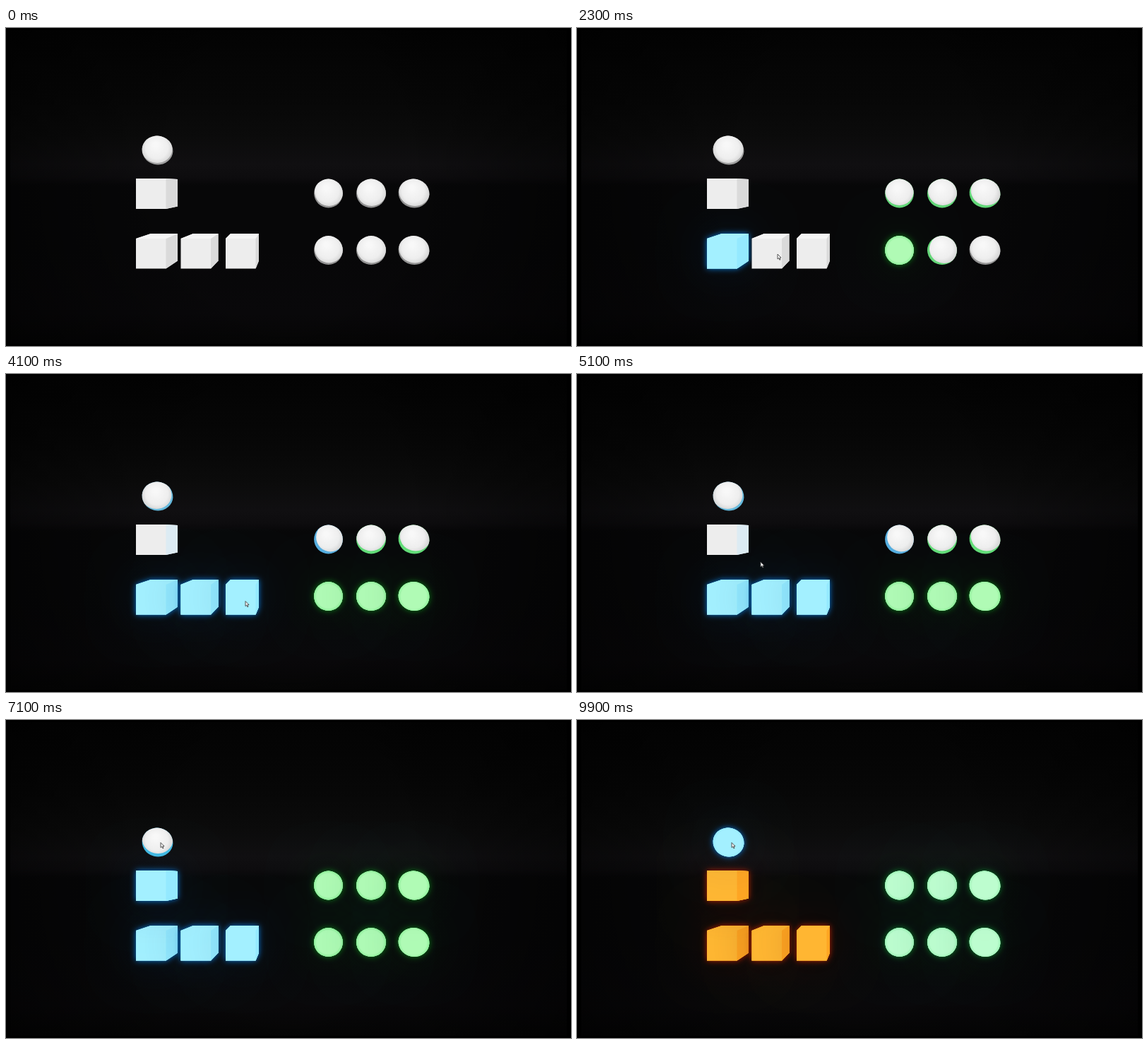
These frames come from a looping animation (800 px wide and 450 px high, 10 s). An HTML page with a canvas:

```html
<!DOCTYPE html>
<html lang="en">
<head>
<meta charset="utf-8">
<title>Cubes and spheres</title>
<style>
html, body { margin: 0; width: 100%; height: 100%; overflow: hidden; background: #000; }
canvas { display: block; width: 800px; height: 450px; }
</style>
</head>
<body>
<canvas id="stage" width="800" height="450"></canvas>
<script>
const c = document.getElementById('stage').getContext('2d');
const LOOP = 10000;

// x: front left, r: front right, b: back left, e: right edge
const cubes = [
  { x: 184, r: 226.5, b: 205, e: 243, y: 298, on: 800 },
  { x: 247.5, r: 290, b: 265, e: 300.5, y: 298, on: 2700 },
  { x: 311, r: 353.5, b: 318, e: 358, y: 298, on: 3800 },
  { x: 184, r: 226.5, e: 243, y: 213, on: 5700 }
];
const SWITCH = 7400;
const columns = [[456.5, 20.4], [517, 21], [577.5, 22]];
const spheres = [{ x: 214.5, y: 173, rx: 22, on: SWITCH, lamp: true }];
columns.forEach(([x, rx], col) => {
  spheres.push({ x, rx, y: 314.5, col, on: cubes[col].on });
  spheres.push({ x, rx, y: 234, col, upper: true, on: cubes[3].on });
});

const themes = {
  cyan: { face: '#a3f0ff', side: '#94e9ff', glow: '#0879d8', haze: 'rgba(0,55,110,.3)' },
  green: { face: '#b0fbb5', side: '#8ff09a', glow: '#087c18', haze: 'rgba(0,75,12,.4)' },
  mint: { face: '#bdfdcf', side: '#a0f4b7', glow: '#087c2b', haze: 'rgba(0,75,22,.4)' },
  orange: { face: '#ffb632', side: '#ffa522', glow: '#b82000', haze: 'rgba(75,12,0,.4)' }
};

// start, end, tip x, tip y
const moves = [
  [100, 700, 215, 319], [1200, 2200, 284, 320], [3000, 3600, 339, 321.5],
  [4400, 5500, 226, 242], [6200, 6900, 219, 173.5]
];

function polygon(points) {
  const p = new Path2D();
  points.forEach(([x, y]) => p.lineTo(x, y));
  p.closePath();
  return p;
}

function ellipse(x, y, rx, ry, tilt = 0) {
  const p = new Path2D();
  p.ellipse(x, y, rx, ry, tilt, 0, Math.PI * 2);
  return p;
}

function fill(path, color) {
  c.fillStyle = color;
  c.fill(path);
}

function glow(path, theme) {
  c.save();
  for (const [color, blur] of [[theme.haze, 65], [theme.glow, 9]]) {
    c.shadowColor = color;
    c.shadowBlur = blur;
    fill(path, theme.face);
  }
  c.restore();
}

function gradient(g, stops) {
  stops.forEach(([at, color]) => g.addColorStop(at, color));
  return g;
}

const sky = gradient(c.createLinearGradient(0, 0, 0, 450), [
  [0, '#030303'], [.22, '#070707'], [.34, '#0b0b0b'], [.43, '#100f11'],
  [.47, '#0d0c0e'], [.495, '#070708'], [.7, '#070708'], [.9, '#09080a'], [1, '#050505']
]);
const vignette = gradient(c.createRadialGradient(400, 225, 170, 400, 225, 450), [
  [0, 'rgba(0,0,0,0)'], [1, 'rgba(0,0,0,.55)']
]);

function background() {
  c.fillStyle = '#000';
  c.fillRect(0, 0, 800, 450);
  for (const paint of [sky, vignette]) {
    c.fillStyle = paint;
    c.fillRect(6, 3, 788, 444);
  }
}

function cubeShape({ x, r, b, e, y }) {
  return b
    ? polygon([[x, y], [b, 291], [e, 291], [e, 329.5], [r, 340.5], [x, 340.5]])
    : polygon([[x, y], [r, y], [e, y + 1], [e, y + 39.5], [r, y + 43], [x, y + 43]]);
}

function drawCube(cube, t) {
  const { x, r, b, e, y, on } = cube;
  const theme = t >= SWITCH ? themes.orange : themes.cyan;
  const lit = t >= on;
  const shape = cubeShape(cube);
  if (lit) glow(shape, theme);
  fill(shape, lit ? theme.face : '#ededed');
  const side = b
    ? polygon([[r, y], [e, 291], [e, 329.5], [r, 340.5]])
    : polygon([[r, y], [e, y + 1], [e, y + 39.5], [r, y + 43]]);
  const dim = !b && t >= 3800 ? '#dcebf3' : '#dadada';
  fill(side, lit ? theme.side : dim);
  if (b && !lit) fill(polygon([[x, y], [b, 291], [e, 291], [r, y]]), '#f5f5f5');
}

// Colour and direction of light reaching the underside of an unlit sphere
function bounce({ col, upper, lamp }, t) {
  if (lamp) {
    if (t >= 5700) return ['#42b8e2', 0, 4.5];
    return t >= 3800 ? ['#65b9dc', 2, 2.5] : ['#a0a0a0', 1, 2.5];
  }
  if (upper) {
    if (t >= 3800) return col ? ['#62dc78', col === 2 ? -2 : 0, 4] : ['#55aee0', -3, 3];
    if (t >= 800) return ['#62d778', -col, 3.5];
  } else if (col && t >= cubes[col - 1].on) {
    return ['#65d779', -3, 2];
  }
  return ['#929292', -.8, 2.5];
}

function drawSphere(s, t) {
  const { x, y, rx, on, lamp } = s;
  const tilt = rx > 21 ? .25 : 0;
  const shape = ellipse(x, y, rx, 20.4, tilt);
  if (t >= on) {
    const theme = lamp ? themes.cyan : t >= SWITCH ? themes.mint : themes.green;
    glow(shape, theme);
    fill(shape, gradient(c.createRadialGradient(x, y, 5, x, y, rx), [
      [0, theme.face], [.75, theme.face], [1, theme.side]
    ]));
    return;
  }
  const [color, dx, dy] = bounce(s, t);
  fill(shape, color);
  c.save();
  c.clip(shape);
  fill(ellipse(x - dx, y - dy, rx, 20.4, tilt),
    gradient(c.createRadialGradient(x - 3, y - 8, 3, x, y - 2, 23), [
      [0, '#f8f8f8'], [.65, '#eeeeee'], [1, '#d2d2d2']
    ]));
  c.restore();
}

function drawCursor(t) {
  if (t < 100) return;
  let x = 285, y = 255;
  for (const [start, end, toX, toY] of moves) {
    const k = Math.min(1, Math.max(0, (t - start) / (end - start)));
    const ease = k * k * (3 - 2 * k);
    x += (toX - x) * ease;
    y += (toY - y) * ease;
  }
  const arrow = polygon([[0, 0], [0, 7], [1.7, 5.6], [2.9, 8.2], [4, 7.7], [2.9, 5.2], [5, 5]]
    .map(([px, py]) => [x + px, y + py]));
  fill(arrow, '#f4f4f4');
  c.strokeStyle = '#444';
  c.lineWidth = .9;
  c.stroke(arrow);
}

function draw(now) {
  const t = Math.floor(now % LOOP / 100) * 100;
  background();
  cubes.forEach(cube => drawCube(cube, t));
  spheres.forEach(sphere => drawSphere(sphere, t));
  drawCursor(t);
  requestAnimationFrame(draw);
}
requestAnimationFrame(draw);
</script>
</body>
</html>
```
